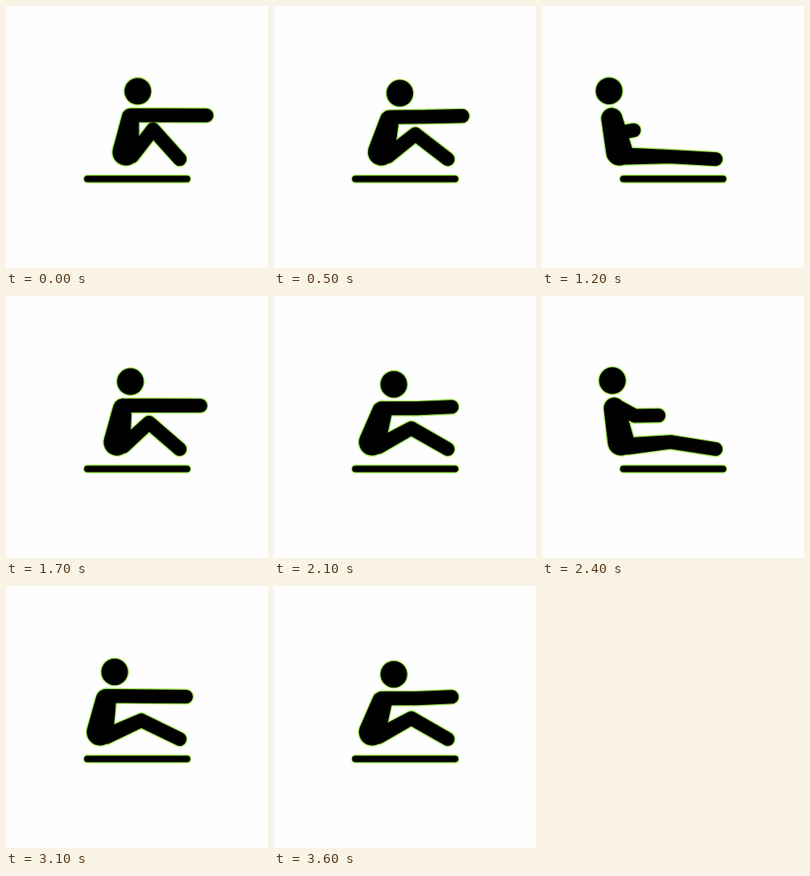
An HTML page that plays this animation: 328x328 px, repeating every 3700 ms.

```html
<!DOCTYPE html>
<html lang="en">
<head>
<meta charset="utf-8">
<title>Rowing exercise</title>
<style>
  html, body { margin: 0; width: 100%; height: 100%; overflow: hidden; background: #fefefe; }
  svg { display: block; width: 100%; height: 100%; }
  #rim { fill: #a2e65a; }
  #ink { fill: #000; }
</style>
</head>
<body>
<svg viewBox="0 0 328 328"><path id="rim"/><path id="ink"/></svg>
<script>
const LOOP = 3700, STEP = 100, HOLD = 300, STROKE = 1500;
const FOOT = [217.5, 191.7];

// Only head, hip and hand are keyed, by x; the rest of the body follows
const KEYS = [
  { at: 0,    head: 165, hip: 150, hand: 251 },   // catch
  { at: 300,  head: 150, hip: 123, hand: 222.5 }, // push
  { at: 500,  head: 102, hip: 102, hand: 177.5 }, // swing
  { at: 750,  head: 77,  hip: 97,  hand: 113 },   // lean back
  { at: 900,  head: 84,  hip: 97,  hand: 115 },   // finish
  { at: 1200, head: 118, hip: 104, hand: 204 }    // recover
];
const LAST = KEYS.length;
KEYS.push({ ...KEYS[0], at: STROKE });

const slope = (i, part) =>
  (KEYS[i + 1][part] - KEYS[i][part]) / (KEYS[i + 1].at - KEYS[i].at);

// Monotone tangent: still at turning points, smooth elsewhere
function tangent(i, part) {
  const a = slope((i + LAST - 1) % LAST, part), b = slope(i % LAST, part);
  return a * b <= 0 ? 0 : 2 * a * b / (a + b);
}

function track(part, phase) {
  const i = KEYS.findIndex(key => key.at > phase) - 1;
  const a = KEYS[i], b = KEYS[i + 1], span = b.at - a.at;
  const u = (phase - a.at) / span, v = 1 - u;
  return a[part] * v * v * (1 + 2 * u) + b[part] * u * u * (3 - 2 * u)
    + span * u * v * (v * tangent(i, part) - u * tangent(i + 1, part));
}

const xy = ([x, y]) => `${x.toFixed(2)} ${y.toFixed(2)}`;
const polar = ([x, y], r, angle) => [x + r * Math.cos(angle), y + r * Math.sin(angle)];

// Outline around two round ends of different radius
function capsule(a, ra, b, rb) {
  const angle = Math.atan2(b[1] - a[1], b[0] - a[0]);
  const spread = Math.acos((ra - rb) / Math.hypot(b[0] - a[0], b[1] - a[1]));
  const from = angle - spread, to = angle + spread;
  return `M${xy(polar(a, ra, from))}L${xy(polar(b, rb, from))}`
    + `A${rb} ${rb} 0 0 1 ${xy(polar(b, rb, to))}L${xy(polar(a, ra, to))}`
    + `A${ra} ${ra} 0 1 1 ${xy(polar(a, ra, from))}Z`;
}

const disc = ([x, y], r) =>
  `M${xy([x - r, y])}a${r} ${r} 0 1 1 ${2 * r} 0a${r} ${r} 0 1 1 ${-2 * r} 0Z`;

function figure(phase, pad) {
  const headX = track('head', phase), hipX = track('hip', phase), handX = track('hand', phase);
  const lean = headX - hipX;
  const fold = Math.max(0, (hipX - 97) / 53); // 0 legs flat, 1 legs drawn up

  const head = [headX, 105 + lean * lean / 130];
  const hip = [hipX, 183];
  const girth = 13.5 - 2.5 * fold * fold;
  const chest = [headX - 0.45 * lean - 2.5, head[1] + 21 + girth];

  const shoulder = [chest[0], head[1] + 30];
  const hand = [handX, 137 + 18.5 * Math.max(0, (251 - handX) / 136) ** 1.5];
  const sag = Math.max(0, 92 - (handX - shoulder[0])) * 0.2;
  const elbow = [(shoulder[0] + handX) / 2 - 0.3 * sag, (shoulder[1] + hand[1]) / 2 + sag];

  const thigh = [hipX + 8, 188];
  const knee = [160 + 24 * fold, 188.5 - 34 * fold ** 0.55];

  const part = (a, ra, b, rb) => capsule(a, ra + pad, b, rb + pad);
  return disc(head, 17 + pad)
    + part(hip, 17, chest, girth)
    + part(shoulder, 9, elbow, 9)
    + part(elbow, 9, hand, 9)
    + part(thigh, 11 - 2 * fold, knee, 9)
    + part(knee, 9, FOOT, 8.9)
    + part([101.8, 216.5], 4.4, [226.7, 216.5], 4.4);
}

const rim = document.getElementById('rim'), ink = document.getElementById('ink');
let shown = -1;

function draw(now) {
  const t = Math.floor(now % LOOP / STEP) * STEP;
  if (t === shown) return;
  const phase = Math.max(0, t - HOLD) % STROKE;
  rim.setAttribute('d', figure(phase, 1));
  ink.setAttribute('d', figure(phase, -0.4));
  shown = t;
}

const start = performance.now();
function tick() {
  draw(performance.now() - start);
  requestAnimationFrame(tick);
}
tick();
</script>
</body>
</html>
```
